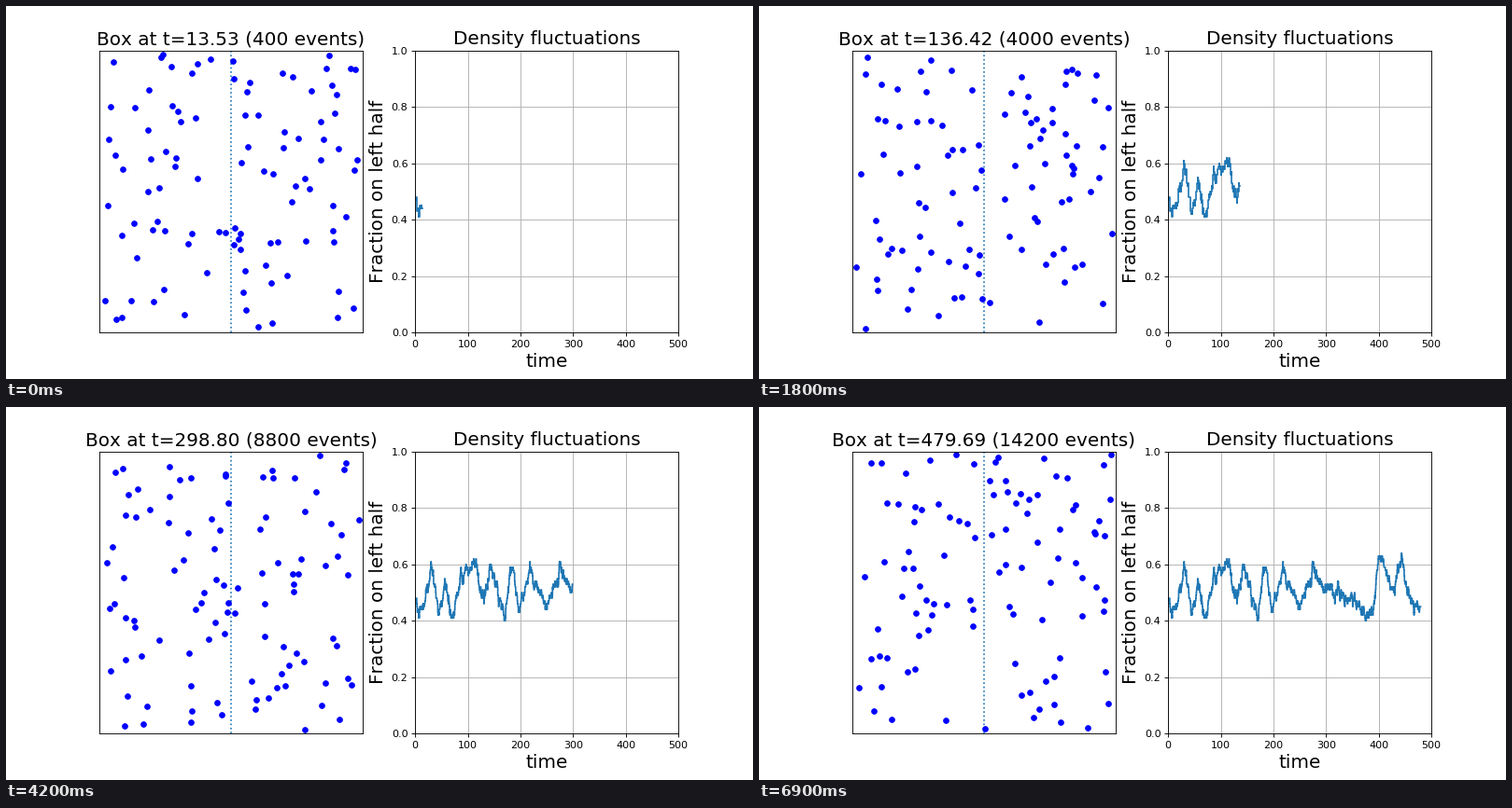
Write a matplotlib script that moves like this. It is 800x400 px and loops after 7000 ms.

```python
import numpy as np
import matplotlib.pyplot as plt
from matplotlib.animation import FuncAnimation

FRAMES = 70
COUNT = 100
RADIUS = 0.01
STEP = 0.1

plt.rcParams["text.kerning_factor"] = 6
rng = np.random.default_rng(12)

# Clock readings at a few event counts, linear in between
EVENTS = 400 + 200 * np.arange(FRAMES)
TIMES = np.interp(
    EVENTS,
    [400, 2800, 5400, 7200, 10400, 12600, 14200],
    [13.53, 95.94, 183.64, 244.19, 353.41, 426.31, 479.69],
)

# Main turning points of the curve: time, discs on the left
TURNS = [
    (0, 47), (8, 42), (34, 58), (44, 42), (56, 53), (70, 41), (87, 56),
    (115, 60), (130, 46), (143, 59), (170, 41), (183, 61), (198, 43),
    (218, 59), (250, 44), (275, 57), (300, 52), (345, 48), (375, 42),
    (389, 44), (400, 63), (414, 59), (426, 50), (444, 61), (464, 43),
    (473, 48), (480, 43),
]


def left_counts(t):
    """Swing between the turning points with a short-lived jitter on top."""
    jitter = np.zeros(len(t))
    for k in range(1, len(t)):
        jitter[k] = 0.75 * jitter[k - 1] + rng.normal()
    trend = np.interp(t, *zip(*TURNS))
    return np.clip(np.rint(trend + jitter), 40, 64).astype(int)


clock = np.arange(0, 480.5, 0.5)
counts = left_counts(clock)

pair_a, pair_b = np.triu_indices(COUNT, 1)


def bounce_walls(pos, vel):
    low, high = pos < RADIUS, pos > 1 - RADIUS
    vel[low] = np.abs(vel[low])
    vel[high] = -np.abs(vel[high])
    np.clip(pos, RADIUS, 1 - RADIUS, out=pos)


def bounce_pairs(pos, vel):
    gap = pos[pair_a] - pos[pair_b]
    near = (gap ** 2).sum(axis=1) < (2 * RADIUS) ** 2
    for a, b, g in zip(pair_a[near], pair_b[near], gap[near]):
        closing = (vel[a] - vel[b]) @ g
        if closing < 0:
            push = closing / (g @ g) * g
            vel[a] -= push
            vel[b] += push


def advance(pos, vel, span):
    steps = int(np.ceil(span / STEP))
    for _ in range(steps):
        pos += vel * span / steps
        bounce_walls(pos, vel)
        bounce_pairs(pos, vel)


def balance(pos, vel, wanted):
    """Mirror discs near the midline until the left half holds the wanted number."""
    for k in np.argsort(np.abs(pos[:, 0] - 0.5)):
        excess = np.sum(pos[:, 0] < 0.5) - wanted
        if excess == 0:
            return
        if (pos[k, 0] < 0.5) != (excess > 0):
            continue
        mirrored = np.array([1 - pos[k, 0], pos[k, 1]])
        others = np.delete(pos, k, axis=0)
        if np.min(np.hypot(*(others - mirrored).T)) > 2 * RADIUS:
            pos[k] = mirrored
            vel[k, 0] *= -1


def simulate():
    pos = rng.uniform(RADIUS, 1 - RADIUS, (COUNT, 2))
    vel = rng.uniform(-0.1, 0.1, (COUNT, 2))
    states, now = [], 0.0
    for t in TIMES:
        advance(pos, vel, t - now)
        now = t
        balance(pos, vel, counts[np.searchsorted(clock, t, side="right") - 1])
        states.append(pos.copy())
    return states


states = simulate()

fig, (box, chart) = plt.subplots(1, 2, figsize=(10, 5), dpi=80)
fig.subplots_adjust(left=0.125, right=0.9, bottom=0.125, top=0.88, wspace=0.2)

box.set(xlim=(0, 1), ylim=(0, 1), xticks=[], yticks=[])
box.axvline(0.5, ls=":", color="C0")
discs, = box.plot([], [], "o", color="#0000ff", ms=5)
title = box.set_title("", fontsize=18)

chart.set(xlim=(0, 500), ylim=(0, 1))
chart.set_title("Density fluctuations", fontsize=18)
chart.set_xlabel("time", fontsize=18)
chart.set_ylabel("Fraction on left half", fontsize=18)
chart.grid(True)
curve, = chart.plot([], [], color="C0", drawstyle="steps-post")


def update(frame):
    t = TIMES[frame]
    discs.set_data(*states[frame].T)
    title.set_text(f"Box at t={t:.2f} ({EVENTS[frame]} events)")
    n = np.searchsorted(clock, t, side="right")
    curve.set_data(np.append(clock[:n], t), np.append(counts[:n], counts[n - 1]) / COUNT)
    return discs, title, curve


anim = FuncAnimation(fig, update, frames=FRAMES, interval=100, repeat=True, repeat_delay=0)
plt.show()
```
